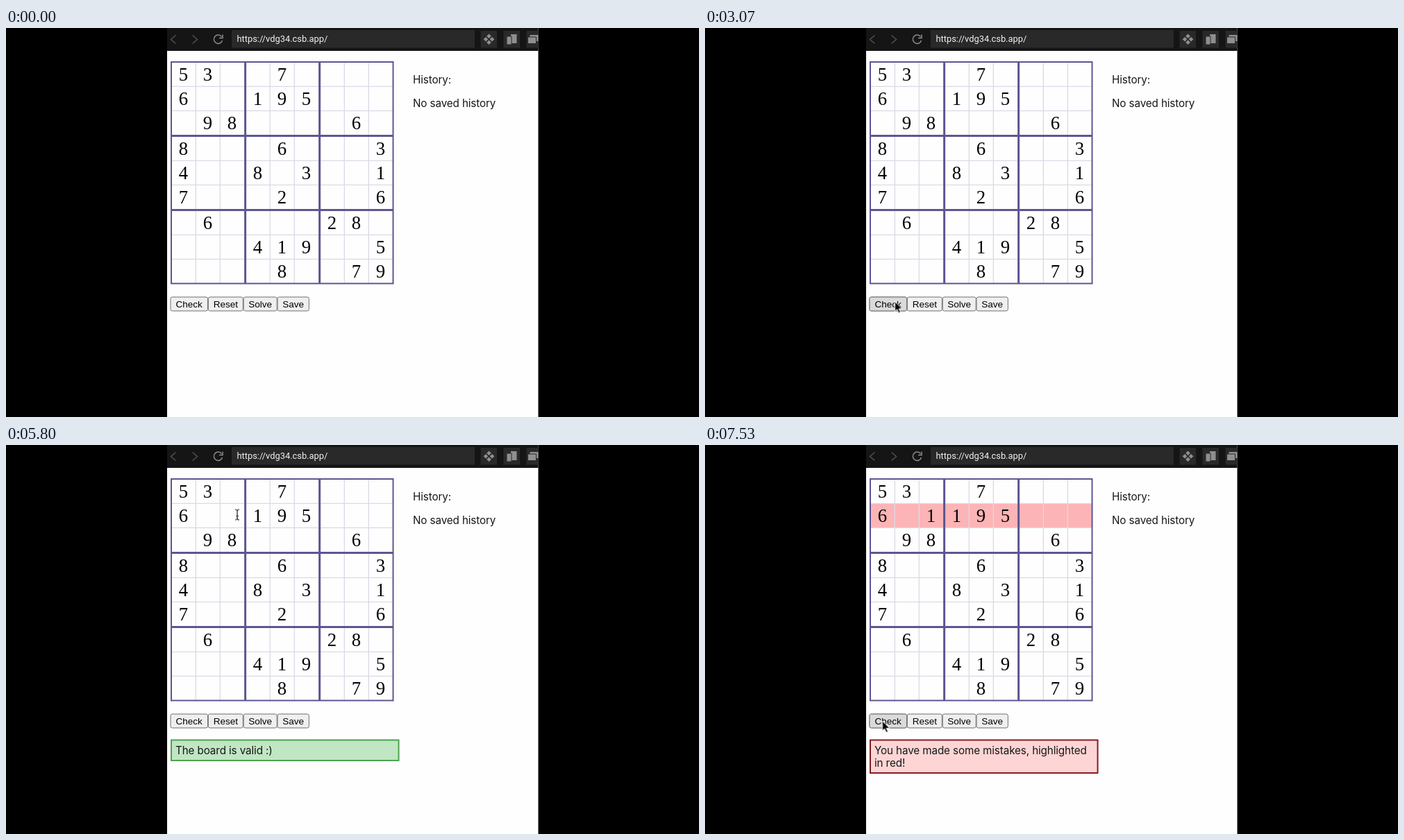
Animation of 998 by 561 pixels, one loop 8 s. Source, as an HTML page:

```html
<!DOCTYPE html>
<html lang="en">
<head>
<meta charset="utf-8">
<title>Sudoku</title>
<style>
  html, body { margin: 0; width: 100%; height: 100%; overflow: hidden; background: #000; }
  svg { display: block; width: 998px; height: 561px; }

  .url { font: 12.85px Roboto, sans-serif; fill: #f2f2f2; }
  .copy text { font: 15.2px Inter, sans-serif; letter-spacing: -.1px; fill: #161616; }
  .digits text { font: 26.7px "Liberation Serif", serif; text-anchor: middle; fill: #000; }
  .button rect { fill: #efefef; stroke: #6f6f6f; }
  .button .dark { fill: #dadada; }
  .button text { font: 13.5px "Liberation Sans", sans-serif; text-anchor: middle; fill: #000; }

  .anim { animation: 8s step-end infinite; }
  .anim, .dark { opacity: 0; }
  .check { animation-name: check; }
  .reset { animation-name: reset; }
  .solve { animation-name: solve; }
  .valid { animation-name: valid; }
  .wrong { animation-name: wrong; }
  .typed { animation-name: typed; }
  .caret { animation-name: caret; }
  .arrow { animation-name: arrow; }
  .beam  { animation-name: beam; }
  .cursor { animation: move 8s step-end infinite; }

  @keyframes check { 0%, 50% { opacity: 0 } 38.3%, 90% { opacity: 1 } }
  @keyframes reset { 0%, 56.6% { opacity: 0 } 50.8% { opacity: 1 } }
  @keyframes solve { 0%, 67.5% { opacity: 0 } 56.6% { opacity: 1 } }
  @keyframes valid { 0%, 80% { opacity: 0 } 39.9% { opacity: 1 } }
  @keyframes wrong { 0% { opacity: 0 } 90% { opacity: 1 } }
  @keyframes typed { 0% { opacity: 0 } 80% { opacity: 1 } }
  @keyframes caret { 0%, 77.5% { opacity: 0 } 74.1% { opacity: 1 } }
  @keyframes arrow { 0%, 67.5% { opacity: 0 } 2.5%, 89.1% { opacity: 1 } }
  @keyframes beam  { 0%, 89.1% { opacity: 0 } 67.5% { opacity: 1 } }

  @keyframes move {
    0%     { transform: translate(235px, 498px) }
    3.3%   { transform: translate(250px, 471px) }
    6.67%  { transform: translate(250px, 471px); animation-timing-function: steps(4) }
    10%    { transform: translate(266px, 405px) }
    11.67% { transform: translate(266px, 405px); animation-timing-function: steps(5) }
    15.83% { transform: translate(284px, 393px); animation-timing-function: steps(4) }
    19.1%  { transform: translate(268px, 391px) }
    25.8%  { transform: translate(268px, 391px); animation-timing-function: steps(5) }
    29.9%  { transform: translate(267.5px, 394.5px) }
    38.3%  { transform: translate(273.5px, 394.5px) }
    46.67% { transform: translate(273.5px, 394.5px); animation-timing-function: steps(7) }
    52.5%  { transform: translate(318px, 395px) }
    54.1%  { transform: translate(318px, 395px); animation-timing-function: steps(2) }
    55.8%  { transform: translate(357px, 394px); animation-timing-function: steps(2) }
    57.5%  { transform: translate(364.5px, 394px) }
    61.6%  { transform: translate(365px, 394px) }
    65.8%  { transform: translate(365px, 394px); animation-timing-function: steps(8) }
    72.4%  { transform: translate(333px, 100.5px); animation-timing-function: steps(2) }
    74.1%  { transform: translate(325px, 101px) }
    81.6%  { transform: translate(325px, 101px); animation-timing-function: steps(9) }
    89.1%, 100% { transform: translate(255.5px, 398px) }
  }
</style>
</head>
<body>
<svg viewBox="0 0 998 561">
  <path d="M232 0h534.5v561h-534.5z" fill="#fefefe"/>

  <!-- browser bar -->
  <path d="M232 0h534.5v33h-534.5z" fill="#151515"/>
  <path d="M325 3h350v25.500h-350zM683.500 4h23.500v24.500h-23.500zM716.500 4h23.500v24.500h-23.500zM749.500 4h17v24.500h-17z" fill="#292929"/>
  <g fill="none" stroke="#505050" stroke-width="1.500">
    <path d="M244.500 10.500l-7 6 7 6M268.500 10.500l7 6-7 6"/>
    <path d="M310.500 12.500a6.200 6.200 0 1 0 1 5.500M312 9.500v5h-5" stroke="#8c8c8c"/>
  </g>
  <g fill="#8f8f8f">
    <path d="M695.500 8.500l3.300 3.300-3.300 3.300-3.300-3.300zM691 13l3.300 3.300-3.300 3.300-3.300-3.300zM700 13l3.300 3.300-3.300 3.300-3.300-3.300zM695.500 17.500l3.300 3.300-3.300 3.300-3.300-3.300z"/>
    <path d="M727 9h8.500v13h-8.500z"/>
    <path d="M721 12h7v12h-7z" stroke="#292929"/>
    <path d="M754.500 10h12v9h-12z"/>
    <path d="M751.500 13h12v9.500h-12z" stroke="#292929"/>
  </g>
  <text class="url" x="332.500" y="20.300">https://vdg34.csb.app/</text>

  <!-- board -->
  <path class="anim wrong" d="M238 84.500h319v35h-319z" fill="#fdb4b6"/>
  <g fill="none">
    <path id="thin" stroke="#dadae6" stroke-width="1.300"/>
    <path id="thick" stroke="#5c5692" stroke-width="3"/>
    <path d="M238 49h319.500v319.500h-319.500z" stroke="#5c5692" stroke-width="2"/>
  </g>
  <g id="digits" class="digits"></g>
  <path class="anim caret" d="M325.300 88.500h1.200v28h-1.200z"/>

  <g id="buttons"></g>

  <g class="copy">
    <text x="586" y="80">History:</text>
    <text x="586" y="114">No saved history</text>
    <g class="anim valid">
      <path d="M238 425.500h327.500v29.500h-327.500z" fill="#c1e6c3" stroke="#4ca352" stroke-width="2"/>
      <text x="244" y="446.300">The board is valid :)</text>
    </g>
    <g class="anim wrong">
      <path d="M238 425.500h327.500v47.500h-327.500z" fill="#fdd5d5" stroke="#851d24" stroke-width="2"/>
      <text x="244" y="446.300">You have made some mistakes, highlighted</text>
      <text x="244" y="464.300">in red!</text>
    </g>
  </g>

  <g class="cursor">
    <path class="anim arrow" d="M0 0v14.300l3.200-3 2.300 5.300 2.500-1.100-2.300-5.200h4.500z" fill="#000" stroke="#fff"/>
    <path class="anim beam" d="M-3-7.500q3 0 3 2.500q0-2.500 3-2.500M0-5v10M-3 7.500q3 0 3-2.500q0 2.500 3 2.500M-2 2h4" fill="none" stroke="#222" stroke-width="1.200"/>
  </g>
</svg>
<script>
  const $ = id => document.getElementById(id);
  const rows = ['53..7....', '6..195...', '.98....6.', '8...6...3', '4..8.3..1',
                '7...2...6', '.6....28.', '...419..5', '....8..79'];

  // Blocks repeat every 107px, cells inside a block every 35px.
  const at = i => Math.floor(i / 3) * 107 + i % 3 * 35;
  const digit = (r, c, d, cls = '') =>
    `<text class="${cls}" x="${255.5 + at(c)}" y="${76 + at(r)}">${d}</text>`;
  const cross = (x, y) => `M${x} 49v319M238 ${y}h319`;

  $('thin').setAttribute('d', [1, 2, 4, 5, 7, 8].map(i => cross(238.300 + at(i), 49.300 + at(i))).join(''));
  $('thick').setAttribute('d', [3, 6].map(i => cross(237.600 + at(i), 48.500 + at(i))).join(''));
  $('digits').innerHTML = rows.map((row, r) =>
    [...row].map((d, c) => d === '.' ? '' : digit(r, c, d)).join('')).join('') +
    digit(1, 2, 1, 'anim typed');

  const button = (label, x, w) => {
    const box = cls => `<rect class="${cls}" x="${x}" y="388" width="${w}" height="20" rx="2.5"/>`;
    return `<g class="button">${box('')}${box('dark anim ' + label.toLowerCase())}
      <text x="${x + w / 2}" y="402.500">${label}</text></g>`;
  };
  $('buttons').innerHTML = button('Check', 237, 53.5) + button('Reset', 291.3, 50) +
    button('Solve', 342.2, 48) + button('Save', 391, 45.3);
</script>
</body>
</html>
```
